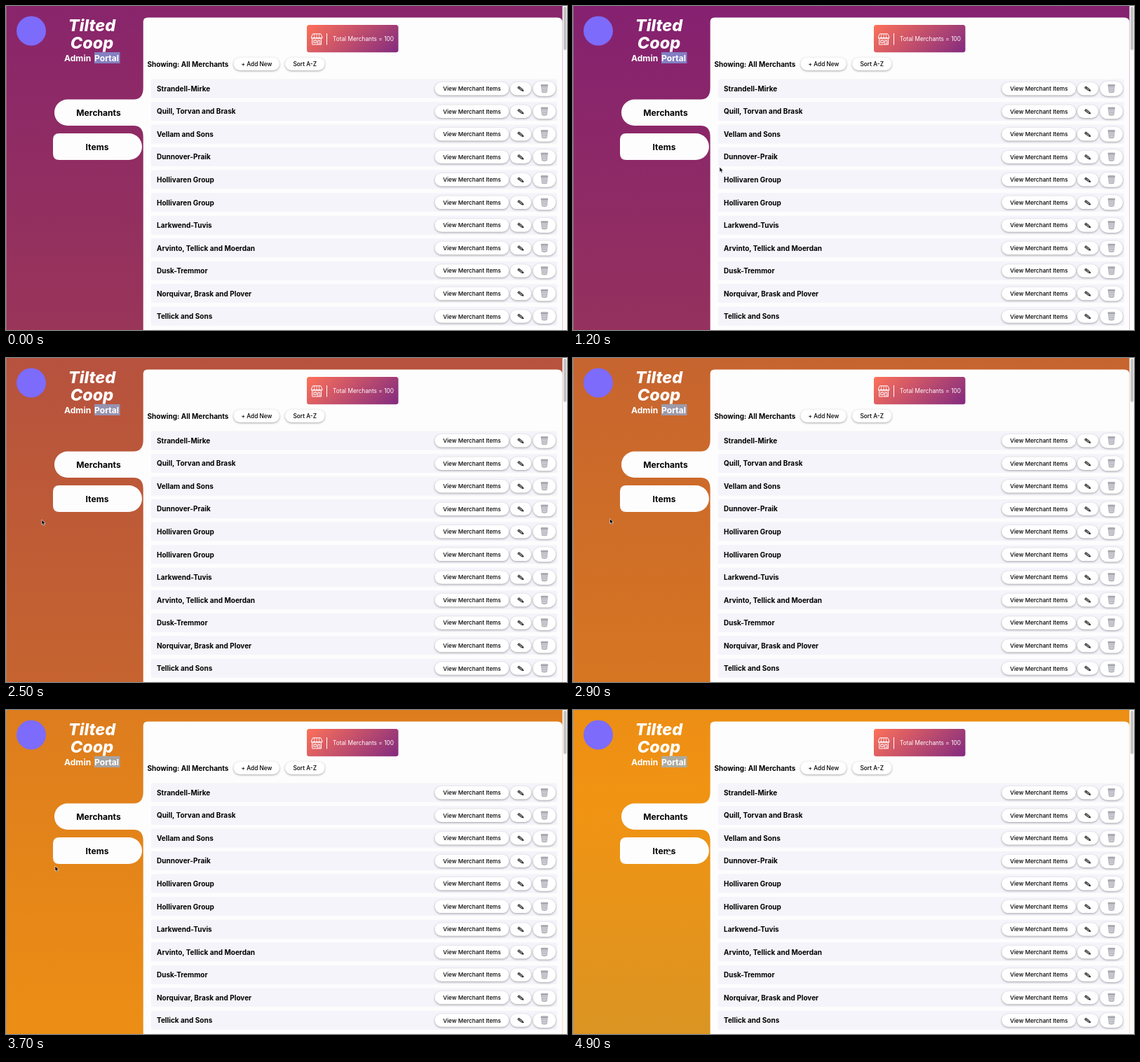
Recreate the animation shown at these times as an HTML page. Size 800 by 463 pixels, loop 5000 ms.

```html
<!DOCTYPE html>
<html lang="en">
<head>
<meta charset="utf-8">
<title>Admin Portal</title>
<style>
  html, body { margin: 0; width: 100%; height: 100%; overflow: hidden; background: #fdfdfe; }
  svg { display: block; width: 100%; height: 100%; }
  text { font-family: Inter, "Open Sans", sans-serif; fill: #000; }
  .mid { text-anchor: middle; }
  .brand { font-size: 23.5px; font-weight: 800; font-style: italic; }
  .sub { font-size: 12.1px; font-weight: 700; }
  .brand, .sub, .stat { fill: #fff; }
  .stat { font-size: 8.3px; font-weight: 430; }
  .tab { font-size: 12.1px; font-weight: 700; }
  .name { font-size: 10px; font-weight: 680; }
  .btn { font-size: 8.3px; font-weight: 500; }
  .view { font-size: 8.2px; font-weight: 500; }
  .pill { fill: #fff; filter: drop-shadow(0 1.3px 1.4px rgba(0, 0, 0, .35)); }
  .line { fill: none; stroke: #fff; stroke-width: 1; stroke-linejoin: round; }
</style>
</head>
<body>
<svg viewBox="0 0 800 463" preserveAspectRatio="none">
  <defs>
    <linearGradient id="sky" x1="0" y1="0" x2="0" y2="1"></linearGradient>
    <linearGradient id="card" gradientUnits="userSpaceOnUse" x1="452" y1="4" x2="536" y2="89">
      <stop offset="0" stop-color="#fd7159"/>
      <stop offset="1" stop-color="#832b80"/>
    </linearGradient>
    <g id="bin" fill="#dcdce2" stroke="#8c8c95" stroke-width=".7">
      <path d="M-4.3-4.6 L-3.3 5 Q0 6.2 3.3 5 L4.3-4.6Z"/>
      <path d="M-2-4 L-1.5 5 M0-4 V5.4 M2-4 L1.5 5 M-4-1.5 H4 M-3.6 1.6 H3.6" stroke-width=".35" fill="none"/>
      <rect x="-4.9" y="-5.7" width="9.8" height="1.8" rx=".9" fill="#b9b9c0"/>
    </g>
    <g id="pen" transform="rotate(36)" stroke="#222" stroke-width=".8" stroke-linejoin="round">
      <path d="M-4.4-1.4 H2 L4.8 0 L2 1.4 H-4.4Z" fill="#aaa"/>
      <path d="M-4.4 0 H2 M-2.8-1.4 V1.4" stroke-width=".6"/>
      <path d="M3.2-.7 L4.8 0 L3.2 .7Z" fill="#222"/>
    </g>
  </defs>

  <rect id="back" width="794" fill="url(#sky)"/>
  <rect width="1" height="463" fill="#999" opacity=".55"/>

  <circle cx="36" cy="35.5" r="21" fill="#7d6bfb"/>
  <text class="brand mid" x="122.5" y="35.5">Tilted</text>
  <text class="brand mid" x="122.5" y="60.5">Coop</text>
  <rect x="126" y="66" width="36.5" height="16" fill="rgba(128,188,254,.6)"/>
  <text class="sub" x="83" y="78.7">Admin</text>
  <text class="sub" x="126" y="78.7">Portal</text>

  <!-- page panel joined to the active tab -->
  <path fill="#fdfdfe" d="M202 16.6 H786 Q793.5 16.6 793.5 24 V463 H195.7 V187
    Q195.7 171 182 171 H87.7 A18.75 18.75 0 0 1 87.7 133.5 H182 Q195.7 133.5 195.7 117
    V22.6 Q195.7 16.6 202 16.6Z"/>
  <path fill="#fdfdfe" d="M76 182 H175 A19 19 0 0 1 175 220 H76 Q67 220 67 211 V191 Q67 182 76 182Z"/>
  <text class="tab mid" x="132" y="157.4">Merchants</text>
  <text class="tab mid" x="130" y="206.2">Items</text>

  <rect x="793.5" width="6.5" height="463" fill="#fafafa"/>
  <rect x="795.2" y="1" width="4" height="62" rx="2" fill="#c1c1c1"/>

  <rect x="429" y="27" width="130.5" height="39.3" rx="3.5" fill="url(#card)"/>
  <g class="line" transform="translate(435 39)">
    <path d="M2.5.8 H13.7 L15.8 5 V6.5 H.5 V5Z"/>
    <path d="M.5 6.3 a1.9 1.9 0 0 0 3.8 0 a1.9 1.9 0 0 0 3.8 0 a1.9 1.9 0 0 0 3.8 0 a1.9 1.9 0 0 0 3.8 0"/>
    <path d="M5 .8 L4.3 6 M8.1 .8 V6 M11.2 .8 L11.9 6" stroke-width=".7"/>
    <path d="M1.7 8.5 V16 H14.5 V8.5 M3.8 10.3 H8 V13.4 H3.8Z M9.8 16 V10.3 H12.6 V16"/>
  </g>
  <path class="line" d="M457.5 39 V55.5"/>
  <text class="stat" x="466" y="49.8">Total Merchants = 100</text>

  <text class="name" x="201.5" y="86.8">Showing: All Merchants</text>
  <g id="page"></g>

  <g id="arrow" stroke="#fff" stroke-width=".6">
    <path d="M0 0 V7.2 L1.6 5.8 L2.8 8.4 L4.1 7.8 L3 5.3 H5.2Z" fill="#000"/>
  </g>
  <g id="hand">
    <path d="M-1.4 1 V-3.2 Q-.7-4.2 0-3.2 V-.6 Q.8-1.1 1.4-.4 Q2.2-.8 2.7 0 Q3.6-.2 3.7 .8
      V2.4 L2.8 4.6 H-1 L-3.4 1.4 Q-3.1.2-2.3.5Z" fill="#fff" stroke="#333" stroke-width=".6"/>
  </g>
</svg>

<script>
const LOOP = 5000, STEP = 100, H = 463, SPAN = 8;
const START = 1200, HALF = 5000, TRAVEL = 6.5;

// gradient stops: place in stage heights, colour
const STOPS = [
  [0, "rgb(133,33,112)"], [1.4, "rgb(156,56,86)"], [2.8, "rgb(182,82,62)"],
  [4.6, "rgb(211,114,36)"], [6.5, "rgb(241,147,18)"], [8, "rgb(195,150,52)"]
];

// pointer path: time, x, y
const PATH = [
  [1100, 232, 226], [1200, 209, 230], [1600, 110, 240], [2000, 42, 242],
  [2500, 51, 231], [3300, 54, 228], [3700, 70, 223], [4100, 137, 202], [5000, 137, 202]
];

const NAMES = [
  "Strandell-Mirke", "Quill, Torvan and Brask", "Vellam and Sons", "Dunnover-Praik",
  "Hollivaren Group", "Hollivaren Group", "Larkwend-Tuvis", "Arvinto, Tellick and Moerdan",
  "Dusk-Tremmor", "Norquivar, Brask and Plover", "Tellick and Sons", ""
];

const $ = id => document.getElementById(id);

const pill = (x, y, w, h) =>
  `<rect class="pill" x="${x}" y="${y - h / 2}" width="${w}" height="${h}" rx="${h / 2}"/>`;

const label = (cls, x, y, s) => `<text class="${cls}" x="${x}" y="${y}">${s}</text>`;

const icon = (id, x, y) => `<use href="#${id}" x="${x}" y="${y}"/>`;

function row(name, i) {
  const y = 118.2 + i * 32.53;
  return `<rect x="207" y="${y - 13.7}" width="579" height="27" rx="2" fill="#f4f4fa"/>` +
    label("name", 215, y + 3.7, name) +
    pill(611.5, y, 105.5, 18.5) + label("view mid", 664.5, y + 3, "View Merchant Items") +
    pill(719, y, 30, 18.5) + icon("pen", 734, y + .3) +
    pill(751.5, y, 32.5, 21) + icon("bin", 767.8, y);
}

$("sky").innerHTML = STOPS.map(([p, c]) =>
  `<stop offset="${p / SPAN}" stop-color="${c}"/>`).join("");
$("back").setAttribute("height", SPAN * H);
$("page").innerHTML =
  pill(324.5, 82.7, 65.5, 18.5) + label("btn mid", 357.5, 85.8, "+ Add New") +
  pill(398, 82.7, 56.5, 18.5) + label("btn mid", 426.2, 85.8, "Sort A-Z") +
  NAMES.map(row).join("");

// cubic-bezier(.25, .1, .25, 1)
function ease(x) {
  const bez = (a, b, u) => 3 * a * u * (1 - u) ** 2 + 3 * b * u * u * (1 - u) + u ** 3;
  let lo = 0, hi = 1;
  for (let i = 0; i < 24; i++) {
    const mid = (lo + hi) / 2;
    if (bez(.25, .25, mid) < x) lo = mid; else hi = mid;
  }
  return bez(.1, 1, lo);
}

function pointer(t) {
  const i = PATH.findIndex(p => p[0] > t);
  if (i < 1) return null;
  const [t0, x0, y0] = PATH[i - 1], [t1, x1, y1] = PATH[i];
  const k = (t - t0) / (t1 - t0);
  return [x0 + (x1 - x0) * k, y0 + (y1 - y0) * k];
}

function place(id, at, on) {
  $(id).style.display = on ? "" : "none";
  if (on) $(id).setAttribute("transform", `translate(${at})`);
}

function draw(t) {
  const shift = t < START
    ? 1 - ease((t - START + HALF) / HALF)
    : ease((t - START) / HALF);
  $("back").setAttribute("transform", `translate(0 ${-shift * TRAVEL * H})`);
  const at = pointer(t);
  const overTab = at && at[0] > 67 && at[0] < 194 && at[1] > 182 && at[1] < 220;
  place("arrow", at, at && !overTab);
  place("hand", at, overTab);
}

const began = performance.now();
function tick() {
  const t = (performance.now() - began) % LOOP;
  draw(Math.floor(t / STEP) * STEP);
  requestAnimationFrame(tick);
}
tick();
</script>
</body>
</html>
```
